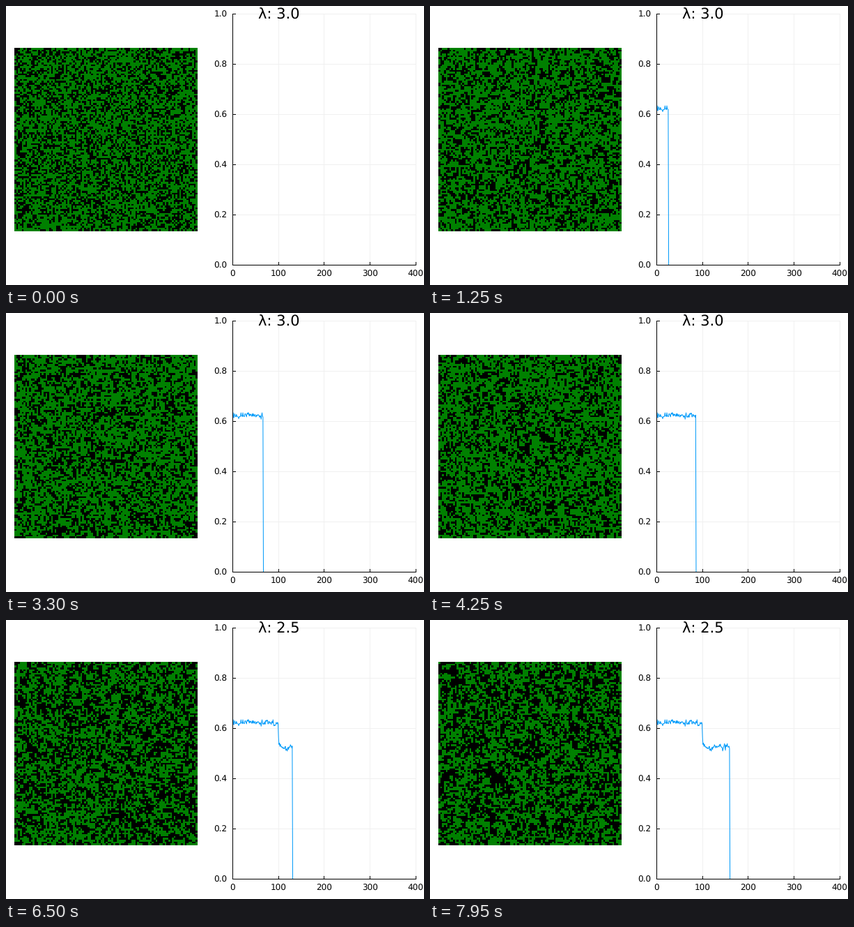
Write a matplotlib script that moves like this. It is 600 px wide and 400 px high and loops after 8000 ms.

```python
import numpy as np
import matplotlib.pyplot as plt
from matplotlib.animation import FuncAnimation

W, H, DPI = 600, 400, 100
FRAMES, INTERVAL = 160, 50
SIZE, STEPS = 100, 400           # lattice side, length of the time axis
LEFT, RIGHT, TOP, BOTTOM = 325.5, 588.2, 11.8, 371.5
GREEN, BLACK = np.array([0, 128, 0], np.uint8), np.zeros(3, np.uint8)

plt.rcParams["font.family"] = "DejaVu Sans"
plt.rcParams["text.hinting"] = "none"
rng = np.random.default_rng(7)


def rate(n):
    return 3.0 if n < 100 else 2.5


def contact_step(grid, lam, dt=0.05):
    """One time unit of the contact process on a torus."""
    for _ in range(round(1 / dt)):
        near = sum(np.roll(grid, s, a).astype(int) for s in (1, -1) for a in (0, 1))
        chance = np.where(grid, dt, dt * lam / 4 * near)
        grid = grid ^ (rng.random(grid.shape) < chance)
    return grid


grids = [rng.random((SIZE, SIZE)) < 0.6]
for n in range(1, FRAMES):
    grids.append(contact_step(grids[-1], rate(n)))
density = np.array([grid.mean() for grid in grids])


def px(x):
    return LEFT + (RIGHT - LEFT) * np.asarray(x) / STEPS


def py(y):
    return BOTTOM - (BOTTOM - TOP) * np.asarray(y)


def paint(grid):
    return np.where(grid[..., None], GREEN, BLACK)


fig = plt.figure(figsize=(W / DPI, H / DPI), dpi=DPI, facecolor="white")
ax = fig.add_axes([0, 0, 1, 1])
ax.axis("off")


def rule(x0, y0, x1, y1, color="black", zorder=3):
    """A straight line filling exactly one row or column of pixels."""
    x, y = np.floor([x0, x1]) + 0.5, np.floor([y0, y1]) + 0.5
    ax.plot(x, y, color=color, lw=72 / DPI, zorder=zorder, snap=False)


def label(x, y, text, size, ha="center"):
    return ax.text(x, y, text, fontsize=size * 72 / DPI, ha=ha, va="baseline")


image = ax.imshow(paint(grids[0]), extent=(11.8, 274, 322.8, 60.4),
                  interpolation="nearest", aspect="auto")

for v in range(0, STEPS + 1, 100):
    x = px(v)
    if v:
        rule(x, TOP, x, BOTTOM, "#f0f0f0", 1)
    rule(x, BOTTOM, x, BOTTOM - 4)
    label(x, 388, str(v), 12)
for v in np.arange(0, 1.1, 0.2):
    y = py(v)
    if v:
        rule(LEFT, y, RIGHT, y, "#f0f0f0", 1)
    rule(LEFT, y, LEFT + 4, y)
    label(317.4, y + 4.4, f"{v:.1f}", 12, "right")
rule(LEFT, TOP, LEFT, BOTTOM)
rule(LEFT, BOTTOM, RIGHT, BOTTOM)

curve, = ax.plot([], [], color="#009afa", lw=72 / DPI, zorder=2, snap=False)
title = label(px(100) + 0.8, 19, "", 21)
ax.set_xlim(0, W)
ax.set_ylim(H, 0)


def update(n):
    image.set_data(paint(grids[n]))
    title.set_text(f"λ: {rate(n):.1f}")
    # entries not yet measured stay at zero
    trace = np.zeros(STEPS)
    trace[:n] = density[1:n + 1]
    curve.set_data(px(np.arange(1, STEPS + 1)), py(trace))
    return image, title, curve


anim = FuncAnimation(fig, update, frames=FRAMES, interval=INTERVAL,
                     repeat=True, repeat_delay=0, blit=False)
plt.show()
```
